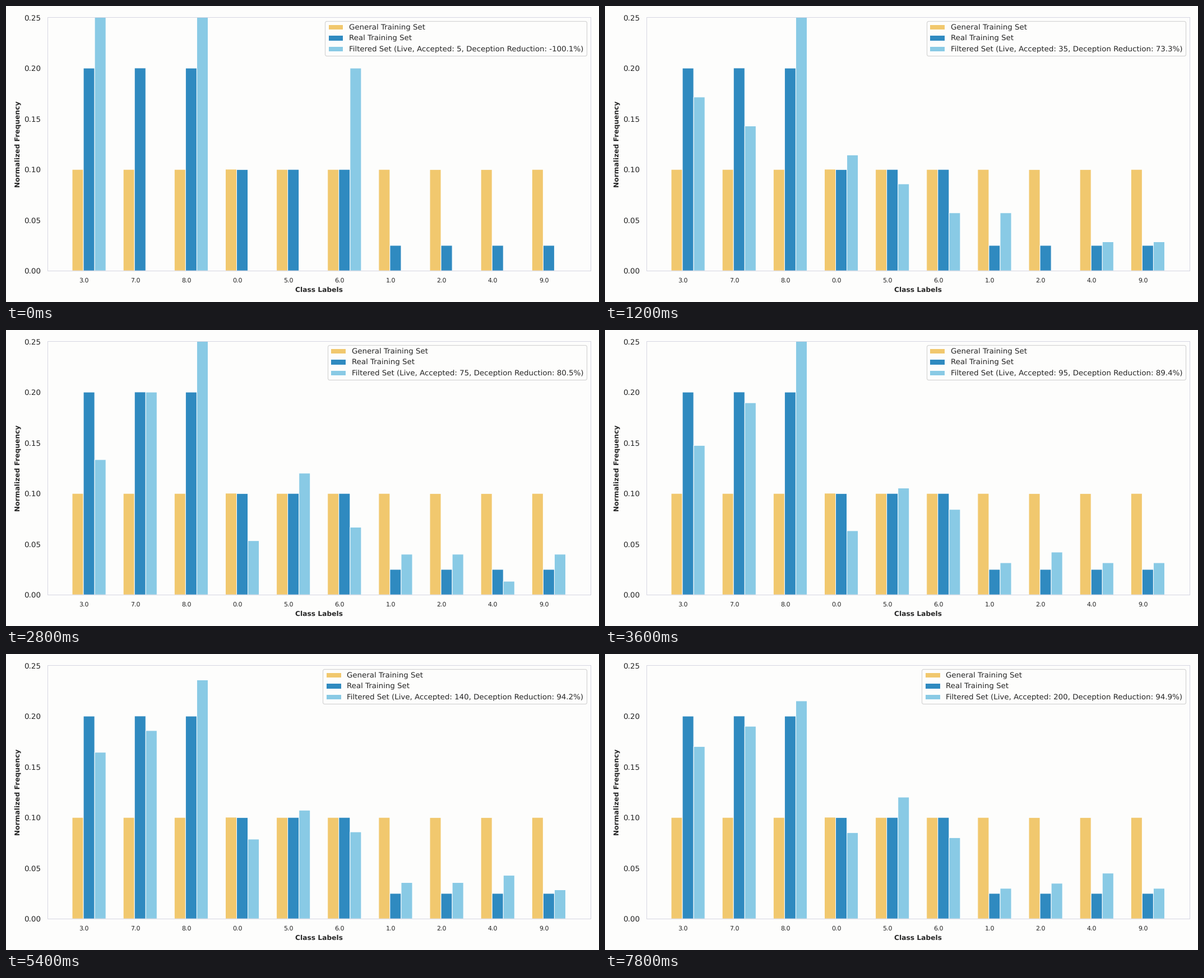
A matplotlib script that plays this animation: 1058 px wide and 529 px high, repeating every 8000 ms.

```python
import numpy as np
import matplotlib.pyplot as plt
from matplotlib.animation import FuncAnimation

W, H, DPI = 1058, 529, 92
PT = 23 / 24            # point size on a 12 x 6 inch canvas
STEP = 5                # samples accepted per frame
FRAMES = 40
BAR = 0.22

BG, INK, LINE = "#fdfdfc", "#262626", "#d6d6e2"
YELLOW, BLUE, SKY = "#f1c86e", "#2f8ac0", "#89cae5"

CLASSES = [3, 7, 8, 0, 5, 6, 1, 2, 4, 9]
x = np.arange(len(CLASSES))

# three common, three middling and four rare classes, with slight sampling noise
real = np.repeat([0.2, 0.1, 0.025], [3, 3, 4])
real[[1, 3]] += [1e-4, -1e-4]
general = np.full(len(x), 0.1)
general[[3, 7, 8]] += [2e-4, -1e-4, -1e-4]

# accepted samples per class at a few key moments
KEYS = np.array([
    [2, 0, 2, 0, 0, 1, 0, 0, 0, 0],
    [3, 1, 3, 2, 2, 1, 1, 0, 1, 1],
    [6, 5, 11, 4, 3, 2, 2, 0, 1, 1],
    [10, 15, 22, 4, 9, 5, 3, 3, 1, 3],
    [19, 22, 30, 9, 12, 11, 4, 5, 5, 3],
    [34, 38, 43, 17, 24, 16, 6, 7, 9, 6],
])
RUNNING = KEYS.cumsum(axis=1)


def divergence(p, q):
    used = p > 0
    return np.sum(p[used] * np.log(p[used] / q[used]))


def state(frame):
    """Class frequencies and legend text; whole counts always add up to n."""
    n = STEP * (frame + 1)
    running = [np.interp(n, RUNNING[:, -1], column) for column in RUNNING.T]
    freq = np.diff(np.rint(running), prepend=0) / n
    reduction = 100 * (1 - divergence(freq, real) / divergence(general, real))
    text = f"Filtered Set (Live, Accepted: {n}, Deception Reduction: {reduction:.1f}%)"
    return freq, text


plt.rcParams.update({
    "font.family": "DejaVu Sans",
    "text.hinting": "none",
    "text.color": INK,
    "axes.labelcolor": INK,
    "axes.edgecolor": LINE,
    "axes.linewidth": 0.8 * PT,
    "axes.labelpad": 4 * PT,
    "toolbar": "None",
})

fig = plt.figure(figsize=(W / DPI, H / DPI), dpi=DPI, facecolor=BG)
left, right, top, bottom = 74, 1042.5, 20.5, 473.2
ax = fig.add_axes([left / W, 1 - bottom / H, (right - left) / W, (bottom - top) / H],
                  facecolor=BG)


def bars(shift, heights, color, label):
    return ax.bar(x + shift * BAR, heights, BAR, color=color, label=label,
                  edgecolor="white", linewidth=0.8 * PT, snap=False)


start, start_text = state(0)
bars(-1, general, YELLOW, "General Training Set")
bars(0, real, BLUE, "Real Training Set")
live = bars(1, start, SKY, start_text)

margin = 1.5 * BAR + 0.05 * (len(x) - 1 + 3 * BAR)
ax.set_xlim(-margin, len(x) - 1 + margin)
ax.set_ylim(0, 0.25)
ax.set_yticks(np.arange(6) * 0.05)
ax.set_xticks(x, [f"{c:.1f}" for c in CLASSES], ha="right")
ax.tick_params(axis="y", length=0, pad=9.5 * PT, labelsize=11 * PT, labelcolor=INK)
ax.tick_params(axis="x", length=0, pad=10.2 * PT, labelsize=9 * PT, labelcolor=INK)
ax.set_xlabel("Class Labels", fontsize=10 * PT, fontweight="bold")
ax.set_ylabel("Normalized Frequency", fontsize=10 * PT, fontweight="bold")

legend = ax.legend(loc="upper right", fontsize=10.95 * PT, facecolor=BG,
                   edgecolor="#cccccc", framealpha=0.8)
legend.get_frame().set_linewidth(1.0 * PT)
live_text = legend.get_texts()[2]


def update(frame):
    freq, text = state(frame)
    for bar, height in zip(live, freq):
        bar.set_height(height)
    live_text.set_text(text)
    return [*live, live_text]


anim = FuncAnimation(fig, update, frames=FRAMES, interval=1000 // STEP,
                     init_func=lambda: update(0), repeat=True, repeat_delay=0,
                     blit=False)
plt.show()
```
